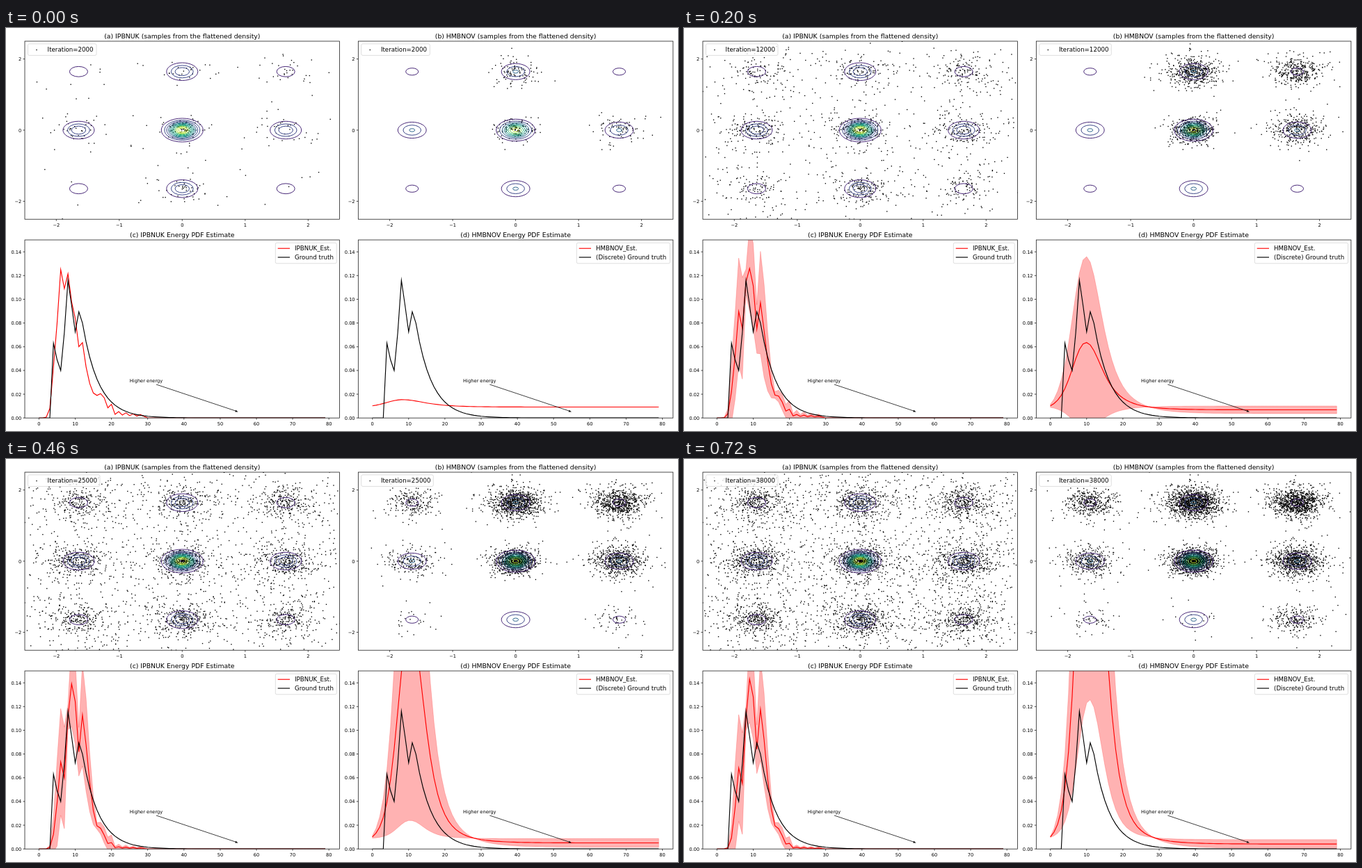
These frames come from a looping animation (966 by 580 pixels, 0.74 s). An HTML page with a canvas:

```html
<!DOCTYPE html>
<html lang="en">
<head>
<meta charset="utf-8">
<style>
html, body { margin: 0; width: 966px; height: 580px; overflow: hidden; background: #fff; }
canvas { display: block; }
</style>
</head>
<body>
<canvas id="stage" width="966" height="580"></canvas>
<script>
const ctx = document.getElementById('stage').getContext('2d');
const STEP = 20, STEPS = 37, PER_K = 150, SHIFT = 479.3;
const NAMES = ['IPBNUK', 'HMBNOV'];
const VIRIDIS = ['#440154', '#482878', '#3e4989', '#31688e', '#26828e', '#1f9e89', '#35b779', '#6ece58', '#b5de2b', '#fde725'];
const LEFT = 27, WIDTH = 452.6, HEIGHT = 256.2, TOP = 19, LOW = 305;
const MODE = 1.645;

const mapX = x => 253.3 + 90.5 * x;
const mapY = y => 147 - 51.2 * y;
const binX = v => 47.4 + 5.21 * v;
const pdfY = p => 561.2 - 1.7075 * p; // p in thousandths
const range = (n, f) => Array.from({ length: n }, (_, i) => f(i));

// Nine modes row by row: how often each is visited, and from which thousand on
const SAMPLERS = [
  { weights: [3, 3, 3, 4, 7, 4, 3, 4, 3], starts: [2, 0, 0, 0, 0, 0, 2, 0, 2], background: 0.45 },
  { weights: [3, 6, 5, 3, 7, 4, 0.5, 1, 3], starts: [12, 0, 2, 12, 0, 0, 12, 33, 21], background: 0 }
];

function generator(seed) {
  return () => {
    seed = seed + 0x6D2B79F5 | 0;
    let t = Math.imul(seed ^ seed >>> 15, 1 | seed);
    t = t + Math.imul(t ^ t >>> 7, 61 | t) ^ t;
    return ((t ^ t >>> 14) >>> 0) / 4294967296;
  };
}

function makeSamples({ weights, starts, background }, seed) {
  const random = generator(seed);
  const gauss = () => Math.sqrt(-2 * Math.log(1 - random())) * Math.cos(2 * Math.PI * random());
  return range(38 * PER_K, i => {
    const k = i / PER_K;
    const active = weights.map((w, mode) => k < starts[mode] ? 0 : w);
    let pick = random() * active.reduce((a, b) => a + b), mode = 0;
    while (pick >= active[mode]) pick -= active[mode++];
    let spread = (random() < 0.25 ? 0.3 : 0.19) * (mode === 4 ? 0.78 : 1);
    if (random() < background * Math.min(1, (k + 1) / 4)) {
      spread = 0.56;
      mode = Math.floor(random() * 9);
    }
    return [mapX((mode % 3 - 1) * MODE + spread * gauss()), mapY((1 - Math.floor(mode / 3)) * MODE + spread * gauss())];
  });
}
const samples = SAMPLERS.map((sampler, i) => makeSamples(sampler, 11 + i));

// Energy curves, in thousandths; key points first, then a decaying tail
const TRUTH = [0, 0, 0, 0, 63, 49, 40, 72, 116, 95, 72.5, 89.5, 80];
while (TRUTH.length < 80) TRUTH.push(TRUTH.at(-1) * 0.8);
const EARLY = [0, 0, 0.6, 8, 43, 80, 125, 109, 121.5, 98, 84, 60, 63.5, 43, 29, 21, 19, 20.5, 17, 8.5, 11.5];
const LATE = [0, 0, 0, 0.5, 8, 33, 66, 53, 110, 145, 130, 85, 120, 94, 60, 34, 19.5, 17, 11, 4, 4.5];
for (let v = 21; v < 80; v++) {
  EARLY[v] = v < 30 ? (v % 2 ? 3 : 6) * Math.exp((21 - v) / 9) : 0;
  LATE[v] = EARLY[v] / 4;
}

function jaggedCurve(k) {
  const fade = Math.exp((2 - k) / 11);
  return range(80, v => {
    const change = EARLY[v] - LATE[v];
    const mean = LATE[v] + change * fade;
    return [mean, Math.min(0.72 * Math.abs(change) + 2.5, 1.2 * mean)];
  });
}

function smoothCurve(k) {
  const base = 3 + 6.8 * Math.exp(-k / 21);
  const gain = Math.log((13 + 0.74 * k ** 1.7) / base);
  const ratio = 2.745 - 0.568 * Math.log(k);
  const noise = 3.7 * (1 - Math.exp(-k / 6));
  const centre = 7.9 + 0.8 * Math.log(k);
  const start = -Math.log(Math.log(10.2 / base) / gain);
  return range(80, v => {
    const d = v - centre;
    const shape = d < 0 ? Math.exp(-start * (-d / centre) ** 2.2) : 1 / Math.cosh(d / (6 + k / 25));
    const mean = base * Math.exp(gain * shape);
    return [mean, Math.abs(ratio * (mean - base) - noise)];
  });
}

function text(str, x, y, size, align = 'left') {
  ctx.font = `${size}px "DejaVu Sans", sans-serif`;
  ctx.textAlign = align;
  ctx.fillStyle = '#000';
  ctx.fillText(str, x, y);
}

function path(points, color, width = 1.15) {
  ctx.beginPath();
  points.forEach(([x, y]) => ctx.lineTo(x, y));
  ctx.strokeStyle = color;
  ctx.lineWidth = width;
  ctx.stroke();
}

function dot(x, y) {
  ctx.fillRect(x - 0.68, y - 0.68, 1.36, 1.36);
}

function clipped(top, draw) {
  ctx.save();
  ctx.beginPath();
  ctx.rect(LEFT, top, WIDTH, HEIGHT);
  ctx.clip();
  draw();
  ctx.restore();
}

function legendBox(x, y, w, h) {
  ctx.beginPath();
  ctx.roundRect(x, y, w, h, 2);
  ctx.fillStyle = 'rgba(255,255,255,.8)';
  ctx.fill();
  ctx.strokeStyle = 'rgba(204,204,204,.8)';
  ctx.lineWidth = 0.8;
  ctx.stroke();
}

function axes(top, title, xTicks, yTicks) {
  const bottom = top + HEIGHT;
  ctx.strokeStyle = '#000';
  ctx.lineWidth = 0.7;
  ctx.strokeRect(LEFT, top, WIDTH, HEIGHT);
  xTicks.forEach(([x, label]) => {
    path([[x, bottom], [x, bottom + 2.5]], '#000', 0.7);
    text(label, x, bottom + 10.4, 6.67, 'center');
  });
  yTicks.forEach(([y, label]) => {
    path([[LEFT, y], [LEFT - 2.5, y]], '#000', 0.7);
    text(label, LEFT - 4.7, y + 2.5, 6.67, 'right');
  });
  text(title, LEFT + WIDTH / 2, top - 4.2, 9.3, 'center');
}

function contours(panel) {
  // Rings where a Gaussian bump crosses evenly spaced levels
  const [centre, edge, corner, levels] = panel ? [8.4, 3.13, 1.25, 9] : [11.8, 3.99, 1.59, 12];
  for (let i = -1; i <= 1; i++) for (let j = -1; j <= 1; j++) {
    const height = [centre, edge, corner][Math.abs(i) + Math.abs(j)];
    for (let level = 1; level < height; level++) {
      const r = Math.sqrt(366 * Math.log(height / level));
      ctx.beginPath();
      ctx.ellipse(mapX(i * MODE), mapY(j * MODE), r, r * 0.566, 0, 0, 7);
      ctx.strokeStyle = VIRIDIS[Math.round(level / levels * 9)];
      ctx.lineWidth = 1;
      ctx.stroke();
    }
  }
}

const signed = n => String(n).replace('-', '\u2212');
const mapXTicks = [-2, -1, 0, 1, 2].map(n => [mapX(n), signed(n)]);
const mapYTicks = [-2, 0, 2].map(n => [mapY(n), signed(n)]);
const binTicks = range(9, i => [binX(i * 10), i * 10]);
const pdfTicks = range(8, i => [pdfY(i * 20), (i * 0.02).toFixed(2)]);

function samplePanel(panel, k) {
  clipped(TOP, () => {
    ctx.fillStyle = '#000';
    samples[panel].slice(0, k * PER_K).forEach(([x, y]) => dot(x, y));
    contours(panel);
  });
  axes(TOP, `(${'ab'[panel]}) ${NAMES[panel]} (samples from the flattened density)`, mapXTicks, mapYTicks);
  legendBox(31.5, 22.8, k < 10 ? 98.5 : 103.5, 16.6);
  ctx.fillStyle = '#000';
  dot(44, 31.5);
  text(`Iteration=${k * 1000}`, 59.6, 33.6, 8.67);
}

function energyPanel(panel, k) {
  const curve = panel ? smoothCurve(k) : jaggedCurve(k);
  const line = f => curve.map(([mean, dev], v) => [binX(v), pdfY(f(mean, dev))]);
  clipped(LOW, () => {
    if (k > 2) {
      const band = line((m, s) => m + s).concat(line((m, s) => m - s).reverse());
      path([...band, band[0]], 'rgba(255,0,0,.3)', 0.7);
      ctx.fillStyle = 'rgba(255,0,0,.3)';
      ctx.fill();
    }
    path(line(m => m), '#f00');
    path(TRUTH.map((p, v) => [binX(v), pdfY(p)]), '#000');
  });
  axes(LOW, `(${'cd'[panel]}) ${NAMES[panel]} Energy PDF Estimate`, binTicks, pdfTicks);

  text('Higher energy', 177.8, 510.4, 6.67);
  path([[216, 513], [331, 551.4]], '#000', 0.75);
  ctx.beginPath();
  [[333.6, 552.4], [329.3, 552.5], [330.4, 549.8]].forEach(p => ctx.lineTo(...p));
  ctx.fill();

  const x = panel ? 341 : 387.3;
  legendBox(x, 309.2, 475.2 - x, 29.6);
  [[NAMES[panel] + '_Est.', '#f00'], [(panel ? '(Discrete) ' : '') + 'Ground truth', '#000']].forEach(([label, color], i) => {
    const y = 317.2 + 12.8 * i;
    path([[x + 3.4, y], [x + 20.7, y]], color);
    text(label, x + 27.7, y + 3.1, 8.67);
  });
}

let shown = -1;
function frame() {
  const step = Math.floor(performance.now() / STEP) % STEPS;
  if (step !== shown) {
    shown = step;
    ctx.fillStyle = '#fff';
    ctx.fillRect(0, 0, 966, 580);
    for (const panel of [0, 1]) {
      ctx.save();
      ctx.translate(panel * SHIFT, 0);
      samplePanel(panel, step + 2);
      energyPanel(panel, step + 2);
      ctx.restore();
    }
  }
  requestAnimationFrame(frame);
}
frame();
</script>
</body>
</html>
```
